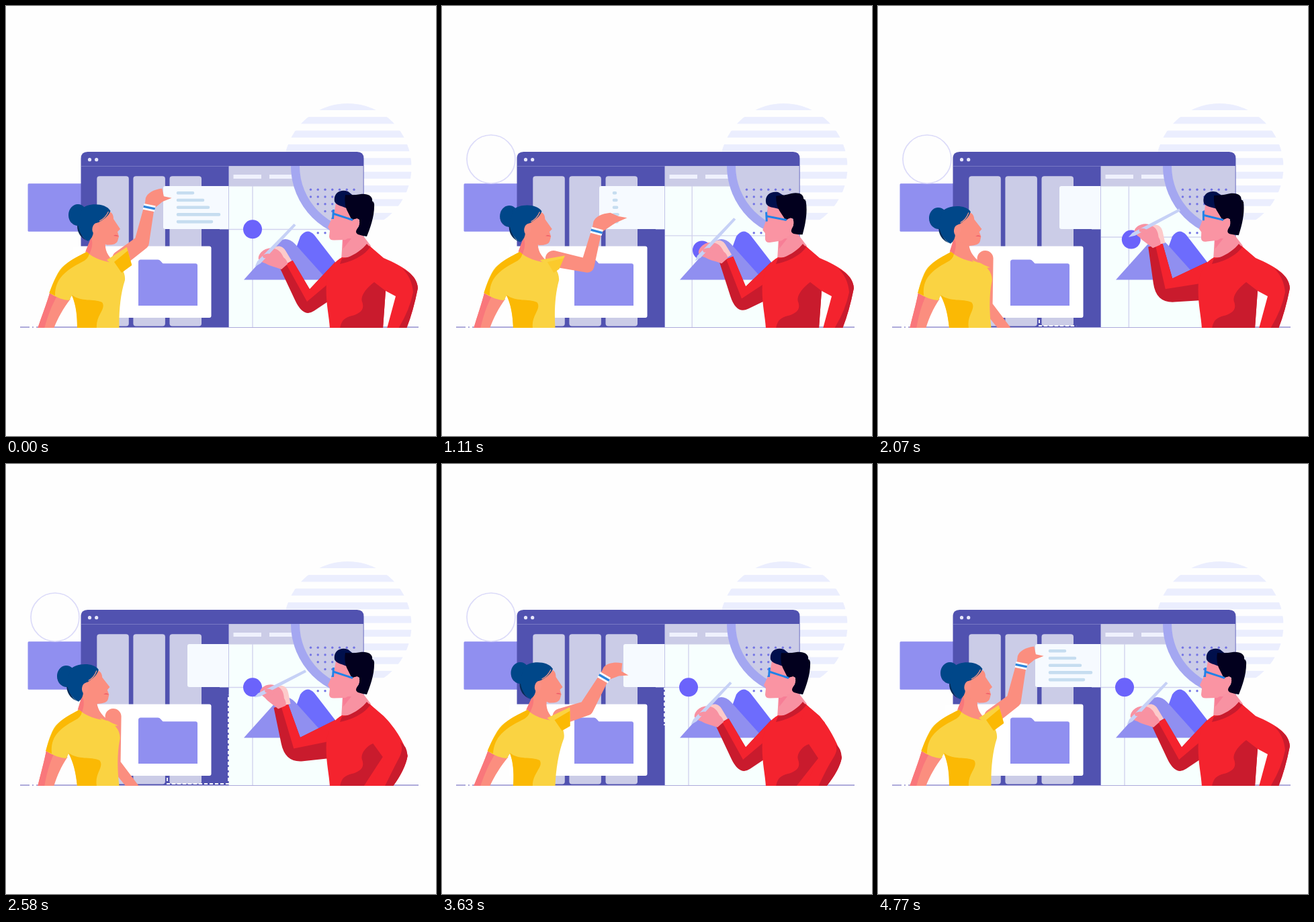
An HTML page for the animation above (4920 ms loop, 640x640 px).

```html
<!DOCTYPE html>
<html lang="en">
<head>
<meta charset="utf-8">
<title>Design team</title>
<style>
html, body { margin: 0; width: 100%; height: 100%; overflow: hidden; background: #fefefe; }
svg { display: block; width: 100%; height: 100%; }
</style>
</head>
<body>
<svg viewBox="0 0 640 640">
  <defs>
    <clipPath id="sun"><circle cx="508.5" cy="240" r="95"/></clipPath>
    <clipPath id="floor"><rect width="640" height="479"/></clipPath>
    <clipPath id="panel"><rect x="332" y="238" width="200" height="240"/></clipPath>
  </defs>

  <g id="stripes" clip-path="url(#sun)" fill="#ebeefe"></g>
  <rect x="32.5" y="264.3" width="82" height="71.5" rx="1.5" fill="#908ff0"/>
  <g fill="none" stroke="#dcdbf9" stroke-width="1.7"><path id="ring"/><path id="innerRing"/></g>
  <path d="M21 478H35M39 478H41M45 478H614" stroke="#928fce" stroke-width="1.7"/>

  <path d="M111.500 478V227Q111.500 217 121.500 217H522.500Q532.500 217 532.500 227V478Z" fill="#5152b0"/>
  <g fill="#e6e6fa"><circle cx="124.500" cy="228.700" r="2.600"/><circle cx="134.700" cy="228.700" r="2.600"/></g>
  <g id="columns" fill="#cbcce7"></g>
  <path d="M112 238.500H532" stroke="#7778c4"/>

  <g clip-path="url(#panel)">
    <path d="M332 238.500H532V478H332Z" fill="#f7fffe"/>
    <path d="M332 238.500H532V268.500H332Z" fill="#cbcce7"/>
    <path d="M338.500 254H380M392 254H436" stroke="#eff1fd" stroke-width="6"/>
    <path id="guides" stroke="#d2d3ee" stroke-width="1.400"/>
    <circle cx="532.500" cy="238" r="108.500" fill="#a4a7f1"/>
    <circle cx="532.500" cy="238" r="95.500" fill="#cbcce7"/>
    <g id="dots" fill="#7475e4"></g>
  </g>
  <path d="M331.500 238V478M532 238V478" stroke="#8d8ed0"/>
  <circle id="ball" r="14" fill="#6b63fb"/>
  <path d="M415 407L438 343Q448 329 459 341L510 407Z" fill="#6d6cfd"/>
  <path d="M354 407.500L402 354Q416 340 430 354L478 407.500Z" fill="#908ff0"/>

  <path d="M318 332H331.500" stroke="#cbd0ee"/>
  <path id="card" fill="#f6faff"/>
  <path id="lines" stroke="#c6ddf0" stroke-width="4.600" stroke-linecap="round"/>
  <path d="M100 357.500H302.500Q305.500 357.500 305.500 360.500V461Q305.500 464 302.500 464H100Z" fill="#fff"/>
  <path d="M197 446V381Q197 377.500 200.500 377.500H226Q228.500 377.500 230 379.500L233.500 383.300H282Q285 383.300 285 386.300V446Z" fill="#908ff0"/>
  <path id="trail" fill="none" stroke="#fff" stroke-width="1.800" stroke-dasharray="5 3"/>

  <g clip-path="url(#floor)">
    <g fill="#fb8e7f">
      <path id="limb"/>
      <g id="hand"><path id="palm"/>
        <path d="M-4 -8.500V9" stroke="#fff" stroke-width="9"/>
        <path d="M-4 -8.500V9" stroke="#2f86dc" stroke-width="3.400"/>
      </g>
    </g>

    <g id="lady">
      <path d="M66 424L96 436C85 450 77 465 71 480H47C53 462 60 445 66 424Z" fill="#fb8e7f"/>
      <path d="M66 424L77 430C68 445 62 462 57 480H47C53 462 60 445 66 424Z" fill="#f9777b"/>
      <path d="M127 344L118 366C130 380 148 387 164 383C150 372 147 362 148 352Z" fill="#fb8e7f"/>
      <path d="M127 345L119 364L124 370C127 362 129 357 128 350Z" fill="#f9777b"/>
      <path d="M120 366C103 375 88 382 80 393C71 407 68 418 64.500 427C75 434 86 438 94 438L98 431C106 448 106 465 106 480H168.500C168 455 170 430 177 408C178 395 170 386 161 382C145 381 130 375 120 366Z" fill="#fad342"/>
      <path d="M120 366C103 375 86 382 76 401C70 412 68 418 64.500 427L73 431C73 406 88 394 113 381Q122 377 124 369Z" fill="#fbb904"/>
      <path d="M98 430C112 441 130 435 143 441C150 451 133 460 135 480H106C106 460 104 445 98 430Z" fill="#fbb904"/>
    </g>
    <path id="sleeve" fill="#fad342"/>
    <path id="cuff" fill="#fbb904"/>

    <g id="ladyHead">
      <path d="M128 318L148 304C157 306 160 309 160 317L170 332L166 336L168 343L166 350Q164 356 150 355.500L128 345Z" fill="#fb8e7f"/>
      <ellipse cx="107" cy="311" rx="14" ry="16" fill="#004789"/>
      <path d="M94 307C91 322 103 331 114 325L110 332C112 342 116 347 122 350C112 346 106 338 106 327C95 325 92 316 94 307Z" fill="#052c58"/>
      <path d="M113 302C120 293 148 292 155.500 305C152 314 144 318 138 322Q129 323 130 335Q130 345 122 350C113 345 107 333 107 321Z" fill="#004789"/>
      <path d="M139 320Q148 316 152.500 306" fill="none" stroke="#fb9b8a" stroke-width="1.200"/>
      <ellipse cx="133.500" cy="331" rx="5" ry="8" fill="#fb9084" transform="rotate(12 133.500 331)"/>
      <path d="M160 342Q164 339 168 343Z" fill="#ee5a68"/>
    </g>

    <path id="drawArm" fill="#c91b2d"/>
    <path id="drawArmLight" fill="#f4232e"/>
    <path d="M501 345L499 378C515 380 535 366 543 357L524 332Z" fill="#f892a2"/>
    <path d="M501 346H514L502 361Z" fill="#f77e96"/>
    <path d="M500 374C490 380 482 388 477 411C475 440 481 460 482 480H561L565 424L570 385L541 357C531 369 515 376 500 374Z" fill="#f4232e"/>
    <path id="restArm" fill="#f4232e"/>
    <g fill="#c91b2d">
      <path id="restShade"/>
      <path id="fold"/>
      <path d="M497 384L500 376C515 374 530 363 537 354L542 359C532 373 512 381 497 384Z"/>
    </g>

    <g id="manHead">
      <path d="M491 293L488 310L479 329L482 334L481 343Q481 349 489 348.500L505 348L524 338L522 298Z" fill="#fa94a3"/>
      <path d="M489 291C487 279 497 272 509 276L519 284L507 301C498 297 492 297 489 291Z" fill="#000f4c"/>
      <path d="M505 281Q518 282 528 280C540 279 546 284 545 290L548 294C549 312 542 331 537 343Q530 342 524 340C519 337 521 334 525 328L526 318Q520 315 515 319L507 303Q503 294 505 281Z" fill="#02001e"/>
      <path d="M543 286L544 291L548 292L544 294L543 298Z" fill="#02001e"/>
      <ellipse cx="521" cy="324" rx="5" ry="8" fill="#fa94a3" transform="rotate(14 521 324)"/>
      <path d="M487.500 303L486.500 317M487 309L516 318.500" stroke="#2182e8" stroke-width="3" fill="none"/>
    </g>

    <g id="drawHand">
      <path d="M25 -25C32 -31 40 -29 44 -22L53 -7L43 -1C39 -12 33 -20 25 -25Z" fill="#fdcaca"/>
      <path d="M4 -9C2 -17 14 -28 25 -25C33 -25 38 -19 41 -12Q47 -7 47 -2L38 6C28 2 20 1 14 -3C10 -4 6 -6 4 -9Z" fill="#f892a2"/>
      <path d="M-1.500 2L2 -6L56.500 -62L59.500 -59.500L7 -3Z" fill="#c6d1f6"/>
      <path d="M10 -15Q18 -20 26 -15Q22 -9 14 -11Q10 -10 10 -15Z" fill="#f892a2"/>
    </g>
  </g>
</svg>
<script>
const LOOP = 4920, STEP = 30;
const $ = id => document.getElementById(id);
const set = (id, v, attr = 'd') => $(id).setAttribute(attr, v);
const lerp = (a, b, k) => a + (b - a) * k;
const mix = (p, q, k) => [lerp(p[0], q[0], k), lerp(p[1], q[1], k)];
const add = (p, q, k = 1) => [p[0] + q[0] * k, p[1] + q[1] * k];
const polar = deg => [Math.cos(deg * Math.PI / 180), Math.sin(deg * Math.PI / 180)];
const normal = ([x, y]) => [-y, x];
const unit = (p, q) => {
  const d = Math.hypot(q[0] - p[0], q[1] - p[1]) || 1;
  return [(q[0] - p[0]) / d, (q[1] - p[1]) / d];
};
const poly = (...pts) => 'M' + pts.join('L') + 'Z';

// Smooth step from 0 to 1 between two times
function ramp(t, from, to) {
  const s = Math.min(1, Math.max(0, (t - from) / (to - from)));
  return s * s * (3 - 2 * s);
}

// Static patterns
const repeat = (n, f) => Array.from({ length: n }, (_, i) => f(i)).join('');
$('stripes').innerHTML = repeat(9, i => `<rect x="410" y="${144.7 + i * 20.4}" width="200" height="10.3"/>`);
$('columns').innerHTML = repeat(3, i => `<rect x="${135.3 + i * 54.1}" y="253.2" width="47.5" height="223.3" rx="4"/>`);
$('dots').innerHTML = repeat(49, i => {
  const col = i % 7, row = Math.floor(i / 7), x = 453.5 + col * 10.75, y = 273.3 + row * 10.75;
  const inside = Math.hypot(x - 532.5, y - 238) < 94;
  const below = row === 6 && (col === 1 || col === 2);
  return inside || below ? `<circle cx="${x}" cy="${y}" r="1.7"/>` : '';
});

function arc(r, from, to) {
  if (to - from < .002) return '';
  const at = k => add([73, 228], polar(k * 360 - 90), r);
  const c = `A${r} ${r} 0 0 1 `;
  return `M${at(from)}${c}${at((from + to) / 2)}${c}${at(to)}`;
}

// Part of the dashed route: down, along the floor, up the divider
function route(a, b) {
  if (b - a < .5) return '';
  const at = s => s < 9 ? [240, 467 + s] : s < 100 ? [231 + s, 476] : [331, 576 - s];
  return 'M' + [a, ...[9, 100].filter(s => s > a && s < b), b].map(at).join('L');
}

// Tapered limb segment with round ends
function bone(a, b, wa, wb) {
  const n = normal(unit(a, b));
  return `M${add(a, n, -wa)}L${add(b, n, -wb)}A${wb} ${wb} 0 0 1 ${add(b, n, wb)}` +
    `L${add(a, n, wa)}A${wa} ${wa} 0 0 1 ${add(a, n, -wa)}Z`;
}

function drawLady(t) {
  const pull = ramp(t, 3720, 4330);
  const lean = -16 * ramp(t, 850, 1450) + 26 * ramp(t, 2740, 3560) - 10 * pull;
  const lift = ramp(t, 2700, 3480);
  const down = ramp(t, 820, 1500) - lift;

  const skew = lean / 159, back = Math.max(0, -lean);
  set('lady', `matrix(1 0 ${-skew} 1 ${479 * skew} 0)`, 'transform');
  set('ladyHead', `translate(${lean * .95} ${back * .19}) rotate(${-back * .28} 131 335)`, 'transform');

  const upper = -37 + 125 * ramp(t, 820, 1500) - 106 * lift - 19 * pull;
  const fore = -78 - 48 * ramp(t, 100, 780) + 178 * ramp(t, 800, 1680) -
    112 * ramp(t, 2700, 3280) - 18 * pull;
  const shoulder = [170 + lean * .65, 376];
  const elbow = add(shoulder, polar(upper), 40 + 30 * down);
  const wrist = add(elbow, polar(fore), 57);
  const thick = 11 - 2.5 * down;
  set('limb', bone(shoulder, elbow, 12, thick) + bone(elbow, wrist, thick, 7.5));

  const open = ramp(t, 100, 780) - ramp(t, 2900, 3500);
  set('hand', `translate(${wrist}) rotate(${fore})`, 'transform');
  set('palm', `M-3 -7L9 -8Q21 -6 28 13L${17 + 9 * open} ${18 + 8 * open}` +
    `L${17 + 10 * open} ${30 + 9 * open}L${9 + 6 * open} ${18 + 6 * open}L-2 9Z`);

  const dir = polar(.8 * upper + 14), half = 14 - 8 * down;
  const end = add(shoulder, dir, 14);
  const top = add(end, normal(dir), -half), low = add(end, normal(dir), half);
  const under = add(shoulder, [2 - 4 * down, 21]);
  set('sleeve', poly(add(shoulder, [-20, 2]), top, low, under));
  set('cuff', poly(add(shoulder, [-9, 5]), mix(top, low, .2), low, under));
  set('cuff', Math.max(0, 1 - 1.7 * down), 'opacity');
}

// Arm with the pen: reach the ball, drag it, come back
function drawPen(t) {
  const hold = 1 - ramp(t, 2420, 2960);
  const grip = ramp(t, 850, 1450) * hold, drag = ramp(t, 1680, 2250) * hold;
  const pose = (x, y, grab, haul) => add(add([x, y], grab, grip), haul, drag);
  const elbow = pose(448, 440, [-5, -11], [-20, -10]);
  const wrist = pose(417, 384, [15, -18], [-25, -13]);
  const tip = pose(372, 386, [15.5, -21], [-16.5, -29.5]);
  set('drawHand', `translate(${tip}) rotate(${25.5 * drag - grip})`, 'transform');

  const top = [490, 381], under = [482, 438];
  const out = unit(add(unit(elbow, wrist), unit(elbow, [488, 410])), [0, 0]);
  const side = normal(unit(wrist, elbow));
  const outer = add(wrist, side, 11), inner = add(wrist, side, -11);
  const crook = add(elbow, out, -19), corner = add(elbow, out, 25);
  set('drawArm', `M${outer}L${mix(corner, outer, .35)}Q${corner} ${mix(corner, under, .4)}` +
    `L${under}L${top}L${crook}L${inner}Z`);
  set('drawArmLight', poly(wrist, elbow, [480, 413], top, crook, inner));
}

// Resting arm: its elbow slides in and closes the gap at the waist
function drawRest(t) {
  const k = ramp(t, 2150, 2720) - ramp(t, 3760, 4360);
  const at = (x, y, dx, dy) => [x + dx * k, y + dy * k];
  const elbow = at(613, 420, -18, 17), knee = at(606, 455, -14, 0);
  const cuff = at(596, 480, -24, 0), pit = at(565, 424, -5, 14);
  set('restArm', `M535 380L541 357L562 375C${at(592, 388, -14, 6)} ${at(612, 400, -20, 22)} ${elbow}` +
    `Q${knee} ${cuff}L${at(567, 480, -27, 0)}L${at(580, 432, -20, 8)}L${pit}L535 420Z`);
  const from = at(590, 391, -4, 27);
  set('restShade', `M${from}Q${at(612, 402, -18, 20)} ${elbow}Q${knee} ${cuff}l-12 0` +
    `Q${at(601, 452, -28, 0)} ${at(606, 426, -24, 12)}Q${at(604, 404, -14, 22)} ${from}Z`);
  set('fold', `M${at(548, 411, -2, 6)}C536 420 527 432 530 440C535 453 525 458 515 461` +
    `C503 464 499 469 497 480L${at(561, 480, -34, 0)}L${pit}Z`);
}

function drawBoard(t) {
  const drop = ramp(t, 1680, 2450);
  const b = ramp(t, 80, 700) * (1 - drop), g = ramp(t, 850, 1450) * (1 - drop);
  set('ball', `translate(${367 + 20 * b} ${332.3 + 31.2 * b})`, 'transform');
  set('guides', `M332 ${332.5 + 23.5 * g}H532M${367 + 13 * g} 268V478`);

  const x = 234 + 36 * (ramp(t, 1400, 1880) - ramp(t, 3720, 4330));
  set('card', `M331.5 268H${x + 3}Q${x} 268 ${x} 271V329Q${x} 332 ${x + 3} 332H331.5Z`);
  const len = 1 - ramp(t, 500, 1250) + ramp(t, 4250, 4720);
  set('lines', len < .01 ? '' : [22, 37, 45, 61, 50]
    .map((n, i) => `M256 ${278.3 + i * 10.7}h${n * len}`).join(''));

  const p = ramp(t, 430, 890);
  set('ring', arc(36, ramp(t, 3680, 4280), p));
  set('innerRing', arc(32.5, Math.max(0, 1.9 * p - 1.35), p * .48));

  const tail = 243 * ramp(t, 2700, 4050);
  set('trail', route(tail, 243 * ramp(t, 1750, 2700)));
  set('trail', tail, 'stroke-dashoffset');
}

function render(t) {
  drawBoard(t);
  drawLady(t);
  drawPen(t);
  drawRest(t);
  const nod = ramp(t, 80, 740) * (1 - ramp(t, 1700, 2600));
  set('manHead', `rotate(${-7 * nod} 515 345)`, 'transform');
}

const start = performance.now();
function tick() {
  const t = (performance.now() - start) % LOOP;
  render(Math.floor(t / STEP) * STEP);
  requestAnimationFrame(tick);
}
tick();
</script>
</body>
</html>
```
